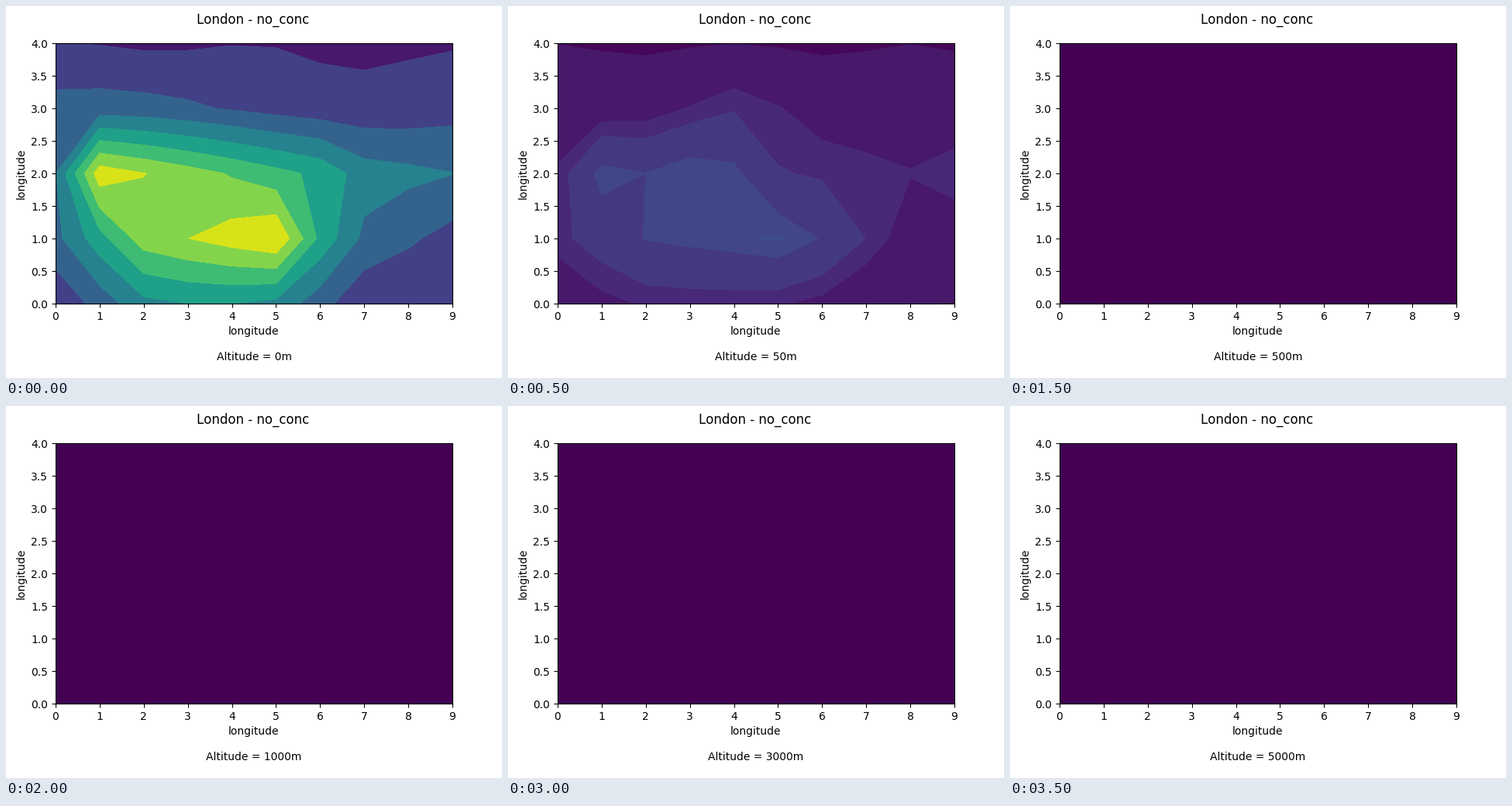
These frames come from a looping animation (640 px wide and 480 px high, 4 s). A matplotlib script:

```python
import matplotlib.pyplot as plt
import numpy as np
from matplotlib.animation import FuncAnimation

ALTITUDES = [0, 50, 250, 500, 1000, 2000, 3000, 5000]
X = np.arange(10)


def path(*points):
    """Straight lines through a few (x, value) points."""
    return np.interp(X, *zip(*points))


def bell(centre, width, power=2):
    return np.exp(-np.abs((X - centre) / width) ** power)


def wave(period, shift=0):
    return np.cos(2 * np.pi * (X - shift) / period)


# One row per y, from 0 up, in contour steps.
ground = np.array([
    1.05 + 2.95 * bell(3.5, 2.65, 4),
    path((0, 2.7), (2, 6.5), (5, 7.97), (6, 4.74), (7, 2.75), (9, 1.6)),
    path((0, 2.97), (1, 7.6), (6, 4.75), (7, 3.48), (9, 3.02)),
    1.9 + 0.55 * wave(12, 1),
    0.95 - 0.015 * X + 0.1 * wave(4.5),
])
low = np.array([
    0.97 + 2.3 * bell(3.5, 3.2, 4),
    path((0, 3.57), (2, 6.08), (4, 6.72), (5, 7.18), (6, 5.88), (8, 2.03), (9, 2.15)),
    path((0, 3.16), (1, 6.58), (2, 6), (3, 6.95), (4, 6.4), (5, 4.13), (8, 3.07), (9, 3.55)),
    2.08 + 1.8 * bell(4, 1.31),
    0.84 + 0.14 * wave(4),
])

# altitude: (values, levels, level at the top of the colour map)
FIELDS = {
    0: (ground, np.arange(9), 8),
    50: (low, np.array([0, 1, 3, 4, 6, 7, 8]), 31),
}

plt.rcParams["text.kerning_factor"] = 6
cmap = plt.get_cmap("viridis")
fig, ax = plt.subplots(figsize=(6.4, 4.8), dpi=100)
fig.subplots_adjust(left=0.1, right=0.9, bottom=0.2, top=0.9)
fig.suptitle("London - no_conc", x=319 / 640, y=471.4 / 480)
caption = fig.text(0.5, 23 / 480, "", ha="center", fontsize=10)


def draw(i):
    altitude = ALTITUDES[i]
    ax.clear()
    ax.set_facecolor(cmap(0.0))
    if altitude in FIELDS:
        values, levels, top = FIELDS[altitude]
        mids = (levels[:-1] + levels[1:]) / 2
        ax.contourf(values, levels=levels, colors=[cmap(m / top) for m in mids])
    ax.set(xlim=(0, 9), ylim=(0, 4), xlabel="longitude", ylabel="longitude")
    caption.set_text(f"Altitude = {altitude}m")
    return []


anim = FuncAnimation(fig, draw, frames=len(ALTITUDES), init_func=lambda: draw(0),
                     interval=500, repeat=True, repeat_delay=0)
plt.show()
```
